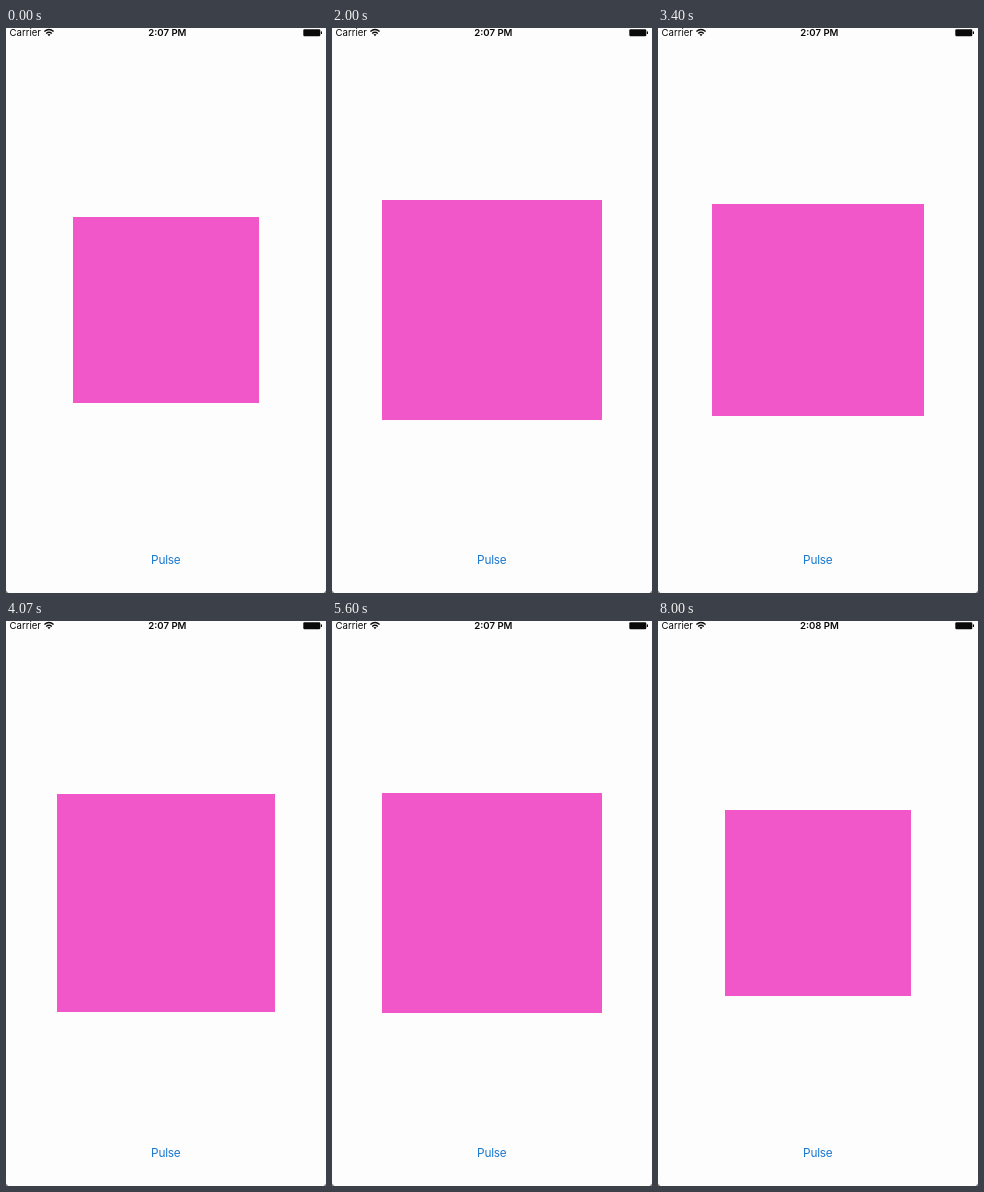
These frames come from a looping animation (320x565 px, 8.74 s). An HTML page:

```html
<!DOCTYPE html>
<html lang="en">
<head>
<meta charset="utf-8">
<title>Pulse</title>
<style>
  html, body { margin: 0; width: 100%; height: 100%; overflow: hidden; background: #fefdfe; }
  svg { display: block; width: 320px; height: 565px; }
  text { font-family: Inter, Roboto, sans-serif; }
  .status { font-size: 9.6px; fill: #0a0a0a; }
  #clock { font-weight: 600; text-anchor: middle; }
  .button { font-size: 11.8px; letter-spacing: -0.2px; fill: #1878d0; text-anchor: middle; }
  #box { fill: #f157c9; transform-box: fill-box; transform-origin: center; }
</style>
</head>
<body>
<svg viewBox="0 0 320 565">
  <text class="status" x="3.6" y="8.2">Carrier</text>
  <g fill="none" stroke="#0a0a0a" stroke-width="1.4">
    <path d="M38.4 3.6Q43 -0.5 47.6 3.6"/>
    <path d="M40.2 5.5Q43 3 45.8 5.5"/>
  </g>
  <path d="M41.5 6.6Q43 5.5 44.5 6.6L43 8.2Z" fill="#0a0a0a"/>
  <text class="status" id="clock" x="161.4" y="8.2">2:07 PM</text>
  <rect x="297.3" y="1.2" width="17" height="7" rx="1.2" fill="#0a0a0a"/>
  <rect x="314.8" y="3.3" width="1.2" height="2.8" rx=".6" fill="#0a0a0a"/>

  <rect id="box" x="67" y="189" width="186" height="186"/>
  <text class="button" x="159.8" y="536.4">Pulse</text>

  <path d="M0 562.5V565H2.5ZM320 562.5V565H317.5Z" fill="#8c8c8c"/>
</svg>
<script>
  const LOOP = 8740, FPS = 15, CLOCK_TICK = 7260;
  const clock = document.getElementById('clock');

  // Three pulses, each one second out and one second back.
  const pulse = document.getElementById('box').animate(
    [{ transform: 'scale(1)', easing: 'ease-in-out' }, { transform: 'scale(1.2)' }],
    { delay: 790, duration: 1000, iterations: 6, direction: 'alternate', fill: 'both' }
  );
  pulse.pause();

  const start = performance.now();

  function draw(now) {
    const t = Math.max(0, now - start) % LOOP;
    pulse.currentTime = Math.floor(t * FPS / 1000 + 0.06) * 1000 / FPS;
    const label = t < CLOCK_TICK ? '2:07 PM' : '2:08 PM';
    if (clock.textContent !== label) clock.textContent = label;
    requestAnimationFrame(draw);
  }
  draw(start);
</script>
</body>
</html>
```
